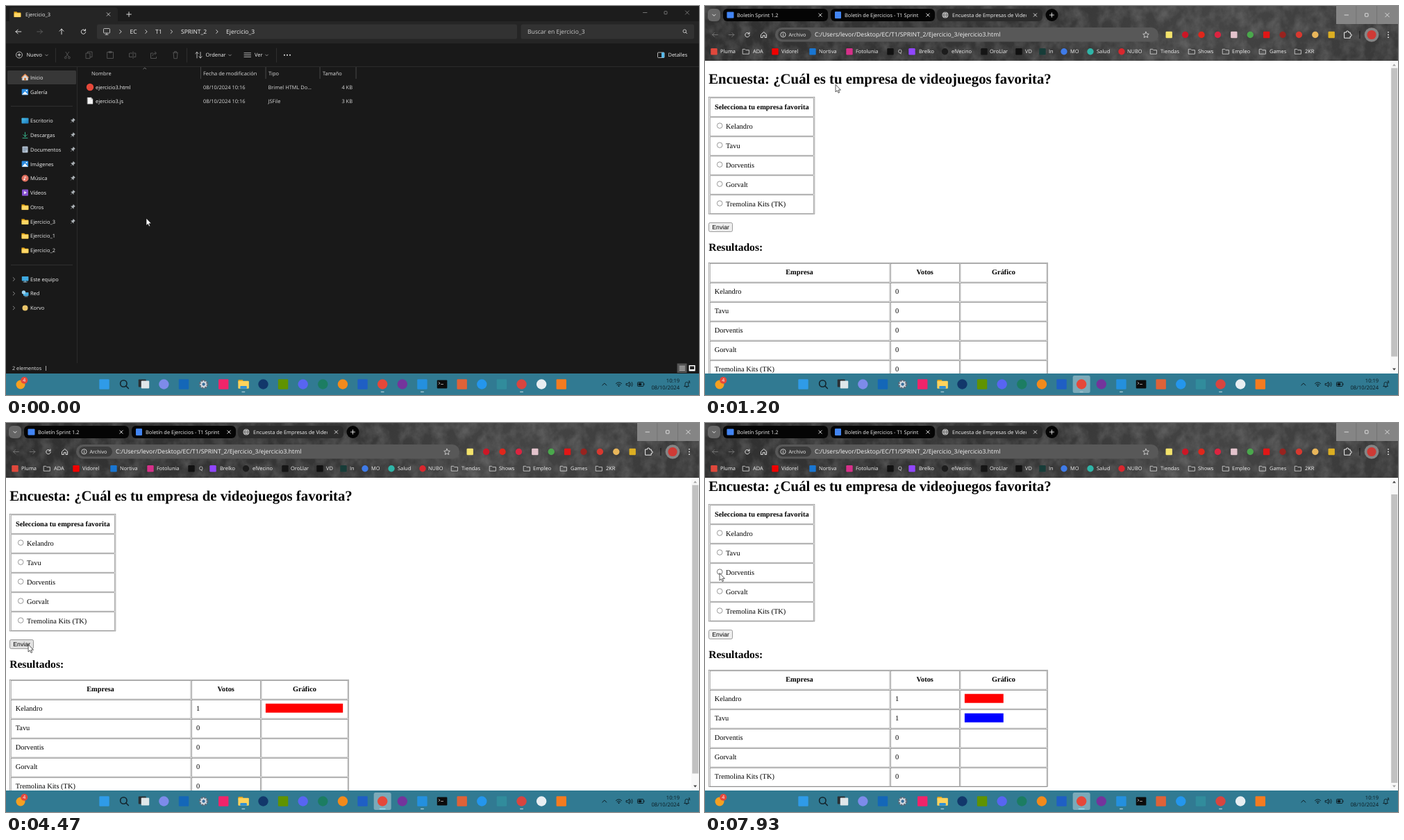
Recreate the animation shown at these times as an HTML page. Size 998x561 px, loop 8000 ms.

```html
<!DOCTYPE html>
<html lang="es">
<head>
<meta charset="utf-8">
<title>Encuesta</title>
<style>
html,body{margin:0;width:100%;height:100%;overflow:hidden;background:#191919}
svg{display:block;width:100vw;height:100vh}
text{font-family:'Open Sans','Noto Sans',sans-serif;font-size:7.45px;white-space:pre;text-rendering:geometricPrecision}
.serif text{font-family:'Liberation Serif',serif;font-size:10.4px}
</style>
</head>
<body>
<svg id="stage" viewBox="0 0 998 561" xmlns="http://www.w3.org/2000/svg"></svg>
<script>
const rect = (x, y, w, h, fill, r = 0, more = '') =>
  `<rect x="${x}" y="${y}" width="${w}" height="${h}" rx="${r}" fill="${fill}" ${more}/>`;
const disc = (x, y, r, fill, more = '') => `<circle cx="${x}" cy="${y}" r="${r}" fill="${fill}" ${more}/>`;
const line = (d, stroke = '#ddd', w = .8, fill = 'none') =>
  `<path d="${d}" stroke="${stroke}" stroke-width="${w}" fill="${fill}" stroke-linecap="round" stroke-linejoin="round"/>`;
const text = (x, y, s, fill = '#f2f2f2', size = 0, more = '') =>
  `<text x="${x}" y="${y}" fill="${fill}" ${size ? `style="font-size:${size}px"` : ''} ${more}>${s}</text>`;
const group = (id, inner, more = '') => `<g id="${id}" ${more}>${inner}</g>`;
const cross = (x, y, r, c = '#ddd') => line(`M${x - r} ${y - r}l${2 * r} ${2 * r}m0 ${-2 * r}l${-2 * r} ${2 * r}`, c, .8);
const plus = (x, y, r, c = '#eee') => line(`M${x - r} ${y}h${2 * r}M${x} ${y - r}v${2 * r}`, c, .9);
const chevR = (x, y, c = '#ddd') => line(`M${x - 1.3} ${y - 2.4}l2.5 2.4l-2.5 2.4`, c, .9);
const chevD = (x, y, c = '#aaa', r = 1.8) => line(`M${x - r} ${y - r / 2}l${r} ${r}l${r} ${-r}`, c, .8);
const folder = (x, y) => line(`M${x - 4.6} ${y - 3.6}h3.4l1.2 1.3h4.6v6h-9.2z`, '#e8a916', .5, '#e8a916') +
  rect(x - 4.8, y - 1.8, 9.6, 5.7, '#ffd766', .7);
const folderLine = (x, y) => line(`M${x - 4.4} ${y - 3.4}h3l1.2 1.3h4.6v5.6h-8.8z`, '#ddd', .8);
const lens = (x, y, r, c, w) => `<circle cx="${x}" cy="${y}" r="${r}" fill="none" stroke="${c}" stroke-width="${w}"/>` +
  line(`M${x + r * .7} ${y + r * .7}l${r * .8} ${r * .8}`, c, w);
const reload = (x, y) => line(`M${x + 2.7} ${y - 1.6}a3.2 3.2 0 1 0 .5 2.2M${x + 3} ${y - 3.6}v2.3h-2.3`, '#eee', .9);
const arrow = (x, y, dir, c) => `<g transform="translate(${x} ${y}) rotate(${dir})">${line('M-3.8 0h7.6M-3.8 0l3-3M-3.8 0l3 3', c, .9)}</g>`;

/* ---------- file manager ---------- */
const sideIcons = {
  home: y => line(`M23.5 ${y}l4-4l4 4v4h-8z`, '#d9d9d9', .5, '#d9d9d9') + line(`M22.8 ${y}l4.7-4.5l4.7 4.5`, '#ee8a4a', 1.2) + rect(26.3, y + .8, 2.4, 3.4, '#c8641e'),
  photo: y => rect(22.7, y - 4.3, 9.4, 8.6, '#2b8be0', 1) + line(`M23.5 ${y + 3.6}l3.8-4.2l4 4.2z`, '#fff', .4, '#fff') + disc(29.6, y - 2, 1, '#fff'),
  desk: y => rect(22.5, y - 4, 10, 8, 'url(#deskFill)', .8),
  down: y => line(`M27.5 ${y - 4}v6.2m-2.8-2.8l2.8 2.8l2.8-2.8M24 ${y + 4.2}h7`, '#35b48a', 1),
  doc: y => rect(23.5, y - 4.6, 8, 9.2, '#b9c7d6', .8) + line(`M25 ${y - 2}h5M25 ${y}h5M25 ${y + 2}h3`, '#4b647d', .7),
  music: y => disc(27.5, y, 5, '#e0705f') + line(`M27 ${y + 1.8}v-4l2 .8`, '#fff', .8) + disc(26.3, y + 1.8, 1, '#fff'),
  video: y => rect(23, y - 4.6, 9, 9.2, '#8550cf', 1) + line(`M26.3 ${y - 1.8}v3.6l3-1.8z`, '#fff', .4, '#fff'),
  dir: y => folder(27.5, y),
  pc: y => rect(22.8, y - 4, 9.6, 6.4, '#3fa9e0', .7) + line(`M27.6 ${y + 2.4}v1.6m-2.5 0h5`, '#9fc7dd', .9),
  net: y => rect(25, y - 1.8, 7.5, 5, '#43a9dd', .6) + disc(25.5, y - 1.8, 2.7, '#9fd4ee') + line(`M27 ${y + 4.2}h4`, '#9fc7dd', .8),
  dot: y => disc(27.5, y, 4, '#e9c46a')
};
const side = [['home', 'Inicio', 103], ['photo', 'Galería', 124], ['desk', 'Escritorio', 165.5], ['down', 'Descargas', 186.2],
  ['doc', 'Documentos', 207], ['photo', 'Imágenes', 227.8], ['music', 'Música', 248.5], ['video', 'Vídeos', 269.2], ['dir', 'Otros', 290],
  ['dir', 'Ejercicio_3', 311], ['dir', 'Ejercicio_1', 331.6], ['dir', 'Ejercicio_2', 352.4], ['pc', 'Este equipo', 394], ['net', 'Red', 414.7], ['dot', 'Korvo', 435.5]];
const pin = y => `<g transform="translate(96 ${y}) rotate(45)">${line('M-1.6 -3.2h3.2l-.4 2.6l1.3 1.4h-5l1.3-1.4zM0 .8v3', '#aeb4b8', .5, '#aeb4b8')}</g>`;

function explorer() {
  let s = rect(0, 0, 998, 530, '#191919') + rect(0, 0, 998, 54, '#1c1c1c') + rect(0, 22, 998, 32, '#252525') +
    rect(5, 2, 156, 24, '#252525', 4) + folder(16.5, 12) + text(28, 14.7, 'Ejercicio_3') + cross(147.5, 12, 2.3) + plus(177, 12, 3.3);
  s += line('M917.5 9.5h5.5', '#888', .8) + rect(948, 7.7, 4, 4, 'none', .6, 'stroke="#888" stroke-width=".8"') + cross(981, 9.5, 2.6, '#888');
  s += arrow(18, 37, 0, '#eee') + arrow(48.5, 37, 180, '#5e5e5e') + arrow(80, 37, 90, '#eee') + reload(111.5, 37);
  s += rect(131, 26.5, 605, 21, '#323232', 2.5) + rect(741.5, 26.5, 249.5, 21, '#323232', 2.5);
  s += rect(140.5, 32.5, 9, 6.6, 'none', 1, 'stroke="#ddd" stroke-width=".8"') + line('M143 41.3h4M145 39.2v2', '#ddd', .8);
  [165, 202, 238.5, 304].forEach(x => s += chevR(x, 37));
  [[178.5, 'EC'], [215, 'T1'], [252, 'SPRINT_2'], [317, 'Ejercicio_3']].forEach(([x, t]) => s += text(x, 40, t, '#f2f2f2', 8.5));
  s += text(751, 40, 'Buscar en Ejercicio_3', '#ccc', 8.5) + lens(977.3, 36.3, 2.3, '#ddd', .8);

  s += `<circle cx="19" cy="70.5" r="4.5" fill="none" stroke="#ddd" stroke-width=".8"/>` + plus(19, 70.5, 2) + text(29.5, 73.4, 'Nuevo') + chevD(58.5, 71);
  s += line('M71.5 61v20M260.5 61v20M389.5 61v20', '#383838', .7);
  s += line('M146 66.5h8.5v9h-8.5zM148.5 65.5h3.5v2h-3.5z', '#5c5c5c', .8);
  s += group('tools', `<path d="M85.8 66l4.6 7.2M90.8 66l-4.6 7.2M115 68h6v7.6h-6zM117.5 68v-2h6.5v7.6h-3M178 68h4M184 68h2.8v5.5h-2.8M182 73.5h-4.5v-5.5M183 65.5v10.5M212 68h-3.5v7.5h8v-2.5M211 72c.5-3 2.5-4 5-4m-2-2.2l2.6 2.2l-2.6 2.2M240.4 67.3h7.2M241.2 67.3l.6 8.4h4.6l.6-8.4M242.6 67v-1.4h2.8v1.4"/><circle cx="85.7" cy="74.5" r="1.4"/><circle cx="91" cy="74.5" r="1.4"/>`,
    'fill="none" stroke="#5c5c5c" stroke-width=".85" stroke-linejoin="round"');
  s += line('M275 75v-8.5m-2.2 2.2l2.2-2.2l2.2 2.2M280 66.5v8.5m-2.2-2.2l2.2 2.2l2.2-2.2', '#ddd', .8) + text(287.5, 73.4, 'Ordenar') + chevD(322.5, 71);
  s += line('M343 67.8h9.5M343 70.6h9.5M343 73.4h9.5', '#ddd', .8) + text(358, 73.4, 'Ver') + chevD(375.5, 71);
  [401, 405, 409].forEach(x => s += disc(x, 70.8, 1, '#eee'));
  s += rect(938.5, 67, 9.5, 7.5, 'none', 1, 'stroke="#ddd" stroke-width=".8"') + rect(944, 67, 4, 7.5, '#55b8ea', .6) + text(953.5, 73.4, 'Detalles');

  s += rect(0, 87, 998, .8, '#303030') + rect(102.2, 88, .8, 427, '#303030') + rect(2, 93, 99, 20, '#373737', 1.5);
  s += rect(7, 144.2, 89, .7, '#3a3a3a') + rect(7, 373, 89, .7, '#3a3a3a');
  side.forEach(([icon, name, y], i) => {
    s += sideIcons[icon](y) + text(35, y + 2.7, name);
    if (i > 1 && i < 10) s += pin(y);
    if (i > 11) s += chevR(11.5, y, '#999');
  });

  [280.5, 374, 452, 504].forEach(x => s += rect(x - .3, 88, .7, 17, '#5a5a5a'));
  s += line('M197.8 90.8l2-1.6l2 1.6', '#999', .7);
  [[123, 'Nombre'], [284, 'Fecha de modificación'], [378, 'Tipo'], [456, 'Tamaño']].forEach(([x, t]) => s += text(x, 99.8, t, '#dcdcdc'));
  s += rect(113.5, 109.5, 388.5, 15.5, '#383838', 1.5, 'id="row"');
  s += disc(121, 117, 5.2, '#e5483a') + line('M117.4 132h5.2l2.4 2.4v6.8h-7.6z', '#ccc', .4, '#f4f4f4') + line('M122.6 132v2.4h2.4', '#999', .6);
  [['ejercicio3.html', 'Brimel HTML Do...', '4 KB', 120.3], ['ejercicio3.js', 'JSFile', '3 KB', 139.7]].forEach(([n, k, z, y]) =>
    s += text(129, y, n) + text(284, y, '08/10/2024 10:16', '#d8d8d8') + text(377.5, y, k, '#d8d8d8') + text(499, y, z, '#d8d8d8', 0, 'text-anchor="end"'));
  s += text(9, 525, '2 elementos', '#e4e4e4', 7.35) + rect(57, 519, .8, 7, '#ccc') +
    group('picked', text(64, 525, '1 elemento seleccionado  3,05 KB', '#e4e4e4', 7.35) + rect(186, 519, .8, 7, '#ccc'));
  s += rect(966.5, 515.5, 14, 13.5, '#555') + line('M970 519.5h7.5M970 521.5h7.5M970 523.5h7.5M970 525.5h7.5', '#eee', .7) +
    rect(983.5, 518, 9, 8.5, '#fff', .6) + rect(985, 519.5, 6, 4.5, '#222');
  return s;
}

/* ---------- browser ---------- */
const marks = [['s', 13, '#e0483c', 'Pluma', 22], ['f', 59, 0, 'ADA', 69], ['s', 101, '#f00000', 'Vidorel', 110], ['s', 155, '#1976d2', 'Nortiva', 164],
  ['s', 208, '#d6308a', 'Fotolunia', 217], ['s', 267, '#111', 'Q', 278], ['s', 298, '#9146ff', 'Brelko', 308], ['c', 345.5, '#1c1c1c', 'elVecino', 355],
  ['s', 402, '#151515', 'OroLlar', 410], ['s', 452, '#101010', 'VD', 461], ['s', 486, '#173c38', 'In', 495], ['c', 517, '#3f7be8', 'MO', 526],
  ['c', 555, '#2fb5a8', 'Salud', 564], ['c', 600, '#d9272e', 'NUBO', 608], ['f', 646, 0, 'Tiendas', 656], ['f', 701, 0, 'Shows', 710],
  ['f', 750, 0, 'Empleo', 759], ['f', 803, 0, 'Games', 813], ['f', 854, 0, '2KR', 864]];
const addons = ['s#f3e36b', 'c#cc1626', 'c#e0261b', 'c#dc2440', 's#e3c3cc', 'c#4aa84c', 's#e01616', 'c#98231f', 'c#d8382f', 'c#e9b65a', 's#dcae22'];
const badge = (kind, x, y, r, c) => kind == 'c' ? disc(x, y, r, c) : rect(x - r, y - r, 2 * r, 2 * r, c, 1.2);

function tabBar() {
  let s = rect(0, 0, 998, 79, 'url(#barFill)') + rect(0, 0, 998, 79, '#000', 0, 'filter="url(#grunge)" opacity=".2"');
  s += rect(4, 4, 18, 18, '#666', 6) + chevD(13, 13.2, '#fff', 2.2);
  s += rect(26, 4, 151, 18, '#050505', 6) + rect(181, 4, 150, 18, '#050505', 6) + rect(334, 4, 152, 18, '#2c2c2c', 6) + disc(499.5, 13, 9, '#050505') + plus(499.5, 13, 3);
  s += rect(31.5, 8.5, 10, 9, '#4285f4', 1) + rect(187, 8, 9, 10, '#4285f4', 1) + disc(346, 13, 4.6, '#b8b8b8') +
    line('M341.5 13h9M346 8.5c-3 3-3 6 0 9c3-3 3-6 0-9', '#444', .6);
  s += text(46, 15.7, 'Boletín Sprint 1.2') + text(201, 15.7, 'Boletín de Ejercicios - T1 Sprint 1', '#f2f2f2', 0, 'clip-path="url(#clipB)"') +
    text(356, 15.7, 'Encuesta de Empresas de Videojuegos', '#f2f2f2', 0, 'clip-path="url(#clipC)"');
  [166, 321, 475.5].forEach(x => s += cross(x, 13, 2.2, '#fff'));
  s += rect(909, 0, 89, 26, '#858585') + rect(937.5, 0, .7, 26, '#6c6c6c') + rect(967, 0, .7, 26, '#6c6c6c') +
    line('M921 13h5.5', '#eee', .8) + rect(950.5, 10.7, 4.5, 4.5, 'none', .5, 'stroke="#eee" stroke-width=".8"') + cross(982.5, 13, 2.8, '#eee');
  s += arrow(14.5, 41.5, 0, '#777') + arrow(38, 41.5, 180, '#777') + reload(61, 41.5) + line('M80.8 41l3.9-3.5l3.9 3.5v4.5h-2.4v-2.8h-3v2.8h-2.4z', '#eee', .9);
  s += rect(101, 31, 552, 20.5, '#585858', 10.2) + rect(105, 34, 48, 14.5, '#3c3c3c', 7.2) +
    `<circle cx="112.5" cy="41.3" r="3.6" fill="none" stroke="#eee" stroke-width=".8"/>` + line('M112.5 41v2M112.5 39.3v.1', '#eee', .9) + text(120.5, 44, 'Archivo', '#eee', 7.2) +
    text(158, 44.3, 'C:/Users/levor/Desktop/EC/T1/SPRINT_2/Ejercicio_3/ejercicio3.html', '#f4f4f4', 8.65);
  s += line('M635 37.2l1.3 2.8l3 .4l-2.2 2.1l.6 3l-2.7-1.5l-2.7 1.5l.6-3l-2.2-2.1l3-.4z', '#ddd', .8);
  addons.forEach((a, i) => s += badge(a[0], 668.2 + 23.4 * i, 41.5, 4.7, a.slice(1)));
  s += line('M921 38h2.8a1.5 1.5 0 1 1 2.8 0h2.6v2.6a1.5 1.5 0 1 1 0 2.8v2.8h-8.2z', '#eee', 1) + rect(942.5, 36, .9, 11, '#111');
  s += disc(960, 41.5, 10.3, '#858585') + disc(960, 41.5, 6.6, '#cf3a35');
  [37.8, 41.5, 45.2].forEach(y => s += disc(984, y, .9, '#eee'));
  marks.forEach(([kind, x, c, name, tx]) => s += (kind == 'f' ? folderLine(x, 65.7) : badge(kind, x, 65.7, 4.7, c)) + text(tx, 68.3, name));
  return s;
}

const brands = ['Kelandro', 'Tavu', 'Dorventis', 'Gorvalt', 'Tremolina Kits (TK)'];
const cell = (x, y, w, h) => rect(x, y, w, h, 'none', 0, 'stroke="#646464" stroke-width=".56"');
const bold = 'font-weight="bold"', mid = bold + ' text-anchor="middle"';

function page() {
  let s = text(5.2, 112, 'Encuesta: ¿Cuál es tu empresa de videojuegos favorita?', '#000', 20.8, bold) +
    text(5.2, 353, 'Resultados:', '#000', 15.6, bold);
  s += cell(5.5, 131.2, 152.4, 168.8) + cell(5.5, 370.2, 488, 168.4) + text(81.8, 149, 'Selecciona tu empresa favorita', '#000', 0, mid);
  [[136, 'Empresa'], [316.7, 'Votos'], [430, 'Gráfico']].forEach(([x, t]) => s += text(x, 387.4, t, '#000', 0, mid));
  for (let i = 0; i < 6; i++) {
    s += cell(7.2, 132.8 + 28 * i, 149, 26.4);
    [[7.2, 258.8], [267.6, 98.8], [367.9, 124.2]].forEach(([x, w]) => s += cell(x, 371.7 + 28 * i, w, 26.4));
  }
  brands.forEach((b, i) => {
    const y = 28 * i;
    s += text(30, 177 + y, b, '#000') + text(13.7, 415 + y, b, '#000') + text(274, 415 + y, '0', '#000', 0, `id="vote${i}"`) +
      `<circle id="ring${i}" cx="21.2" cy="${172.6 + y}" r="3.8" fill="#fff" stroke-width=".75"/>` + disc(21.2, 172.6 + y, 2.3, '#0075ff', `id="dot${i}"`);
  });
  s += rect(373.9, 404.7, 111.3, 13, '#f00', 0, 'id="bar0"') + rect(373.9, 432.7, 55.9, 13, '#00f', 0, 'id="bar1"');
  s += rect(5.5, 312.6, 34, 12.8, '#efefef', 1.8, 'id="send" stroke="#6b6b6b" stroke-width=".65"') +
    text(22.6, 321.8, 'Enviar', '#000', 0, `text-anchor="middle" style="font-family:'Liberation Sans',sans-serif;font-size:8.67px"`);
  return s;
}

function browser() {
  return rect(0, 78, 998, 452, '#fff') + `<g clip-path="url(#view)">${group('page', page(), 'class="serif"')}</g>` +
    rect(987, 79, 11, 451, '#f8f8f8') + rect(988.2, 89.5, 9, 416, '#c1c1c1', 0, 'id="thumb"') +
    '<path id="up" d="M990 86.5h5l-2.5-3z"/><path id="downTip" d="M990 522.5h5l-2.5 3z"/>' + tabBar();
}

/* ---------- task bar ---------- */
const apps = [['s', '#2f9be8'], 'search', 'tasks', ['c', '#7d8bea'], ['s', '#1467b8'], 'gear', ['s', '#f0246a'], 'files', ['c', '#12386b'], ['s', '#5f9300'],
  ['c', '#5865f2'], ['c', '#1c7d62'], ['c', '#f28a1c'], ['s', '#1f5fc4'], ['c', '#e5483a'], ['c', '#74349c'], ['s', '#2490de'], 'term', ['s', '#df6238'],
  ['c', '#2496ed'], ['s', '#318c9c'], ['c', '#d8453f'], ['c', '#e8eef2'], ['s', '#f47b20']];
const appX = i => 141.5 + 28.62 * i;
const odd = {
  search: x => lens(x - .8, 544.5, 4.7, '#14242c', 1.6),
  tasks: x => rect(x - 8, 538.5, 11, 11, '#2a2f33', 1) + rect(x - 4, 540.5, 11.5, 11, '#dfe7ea', 1),
  gear: x => disc(x, 545.5, 5.5, '#d5dbe2', 'stroke="#5e6a78" stroke-width="2.6" stroke-dasharray="2.6 1.72"') + disc(x, 545.5, 2.2, '#386f9a'),
  files: x => rect(x - 7.5, 539, 7, 5, '#e0a11b', 1) + rect(x - 7.5, 540.8, 15.5, 11, '#ffd35c', 1) + rect(x - 4.5, 548, 9.5, 3.8, '#2f8fd8', 1),
  term: x => rect(x - 7.3, 539.5, 14.6, 12, '#0c0c0c', 1) + line(`M${x - 5} 542.5l2 1.5l-2 1.5M${x - 1.5} 545.5h3`, '#ddd', .7)
};
function taskbar() {
  let s = rect(0, 530, 998, 31, '#317a92');
  s += disc(21, 546, 6.5, '#f6a021') + disc(26.3, 539.8, 5, '#e4483b') + text(26.3, 542.4, '4', '#fff', 7, 'text-anchor="middle"');
  [7, 14].forEach(i => s += rect(appX(i) - 12.5, 533, 25, 25, '#fff', 2.5, `id="tile${i}"`));
  apps.forEach((a, i) => {
    const x = appX(i);
    s += typeof a == 'string' ? odd[a](x) : badge(a[0], x, 545.5, 7.2, a[1]);
    if ([7, 14, 16, 21].includes(i)) s += rect(x - 2.5, 555.8, 5, 1.5, '#9fc3cf', .7, `id="dash${i}"`);
  });
  const ink = '#0c1a20';
  s += line('M858.8 547l3-3l3 3', ink, 1) + line('M878.5 544.5q4-3.6 8 0M880 546.3q2.5-2.2 5 0', ink, 1) + disc(882.5, 548, 1, ink) +
    line('M893.5 544.5h1.8l2.5-2.3v7l-2.5-2.3h-1.8z', ink, .9) + line('M899.5 544q1.2 1.7 0 3.4M901.3 542.5q2.2 3 0 6.2', ink, .8);
  s += rect(909.5, 542.5, 8.5, 6, 'none', 1, `stroke="${ink}" stroke-width=".9"`) + rect(910.7, 543.7, 4.5, 3.6, ink) + rect(918.4, 544.3, 1, 2.4, ink);
  s += text(970, 542.6, '10:19', ink, 7.5, 'text-anchor="end"') + text(970, 552.8, '08/10/2024', ink, 7.65, 'text-anchor="end"');
  s += line('M977 548.5h6.5l-.9-1.5v-2.3a2.3 2.3 0 0 0-4.6 0v2.3zM979.3 549.8h2M983 541h2l-2 2.3h2', ink, .8);
  return s;
}

const defs = `<defs>
<linearGradient id="barFill" x2="1" y2=".06"><stop offset="0" stop-color="#303030"/><stop offset=".5" stop-color="#363636"/><stop offset=".75" stop-color="#454545"/><stop offset="1" stop-color="#3a3a3a"/></linearGradient>
<linearGradient id="deskFill" x2="1" y2="1"><stop offset="0" stop-color="#4cc3ee"/><stop offset="1" stop-color="#1a76b8"/></linearGradient>
<filter id="grunge" x="0" y="0" width="1" height="1"><feTurbulence type="fractalNoise" baseFrequency=".06 .05" numOctaves="4" seed="4"/><feColorMatrix values="0 0 0 0 .6 0 0 0 0 .6 0 0 0 0 .6 2 0 0 0 -.7"/></filter>
<clipPath id="clipB"><rect x="200" y="4" width="108" height="18"/></clipPath>
<clipPath id="clipC"><rect x="355" y="4" width="108" height="18"/></clipPath>
<clipPath id="view"><rect y="79" width="987" height="451"/></clipPath></defs>`;

document.getElementById('stage').innerHTML = defs + group('explorer', explorer()) +
  rect(0, 0, 1, 1, '#fff', 0, 'id="blank"') + group('browser', browser()) + taskbar() +
  '<path id="mouse" d="M0 0V10.6L2.4 8.4L4 12L5.7 11.2L4.1 7.8H7.4Z" fill="#fff" stroke="#000" stroke-width=".65" stroke-linejoin="round"/>';

/* ---------- motion ---------- */
const LOOP = 8000, STEP = 200 / 3;
const el = id => document.getElementById(id);
const set = (id, attrs) => { for (const k in attrs) el(id).setAttribute(k, attrs[k]); };
const show = (id, on) => set(id, { visibility: on ? 'visible' : 'hidden' });
const ramp = (t, a, b) => Math.min(1, Math.max(0, (t - a) / (b - a)));
const ease = p => p * p * (3 - 2 * p);
const mix = (a, b, p) => a + (b - a) * p;

// time, x, y of the pointer tip
const path = [[0, 202, 307], [130, 201, 275], [330, 191, 160], [470, 188, 116], [530, 188, 113], [1200, 188, 113], [1600, 194, 148], [1800, 204, 174],
  [1930, 204, 174], [2070, 200, 166], [2200, 200, 166], [2400, 180, 160], [2670, 90, 157], [2870, 36, 168], [3070, 22, 173], [3200, 22, 173],
  [3400, 25, 215], [3670, 31, 302], [3870, 32, 319.5], [4470, 32, 319.5], [4670, 48, 305], [5000, 98, 270], [5270, 118, 257], [5470, 95, 226],
  [5730, 44, 177], [5870, 30, 173], [6070, 24, 186.5], [6130, 23, 187], [6270, 23, 187], [6530, 26, 225], [6800, 32, 292], [7000, 32, 304],
  [7200, 32, 304], [7470, 27, 272], [7730, 22, 226], [7930, 21, 216.5], [8000, 21, 216.5]];
function tip(t) {
  const i = Math.max(1, path.findIndex(p => p[0] >= t)), a = path[i - 1], b = path[i], p = ramp(t, a[0], b[0]);
  return [mix(a[1], b[1], p), mix(a[2], b[2], p)];
}

function draw(now) {
  const t = Math.min(119, Math.floor((now % LOOP + 4) / STEP)) * STEP + 4;
  const [x, y] = tip(t), open = t >= 1200, picked = t >= 800;
  set('mouse', { transform: `translate(${x} ${y})` });

  show('explorer', !open);
  show('browser', open);
  show('picked', picked && !open);
  set('tools', { stroke: picked ? '#9fd2ec' : '#5c5c5c' });
  set('row', { fill: picked ? '#363636' : '#2e2e2e' });
  show('row', !open && (picked || y < 125));

  const g = ease(ramp(t, 1070, 1200));
  show('blank', t >= 1070 && !open);
  set('blank', { x: mix(247.5, 0, g), y: mix(244.5, 0, g), width: mix(535, 998, g), height: mix(284, 530, g) });

  set('tile7', { opacity: open ? 0 : .22 * ramp(t, 740, 930) });
  set('tile14', { opacity: open ? .36 : .24 * ramp(t, 870, 1070) });
  const wide = mix(5, 9, ramp(t, 1600, 1800));
  set('dash14', { x: appX(14) - wide / 2, width: wide, fill: t >= 1670 ? '#8fdcf2' : '#9fc3cf' });

  const off = 14 * ease(ramp(t, 4670, 4870)), py = y + off;
  set('page', { transform: `translate(0 ${-off})` });
  set('thumb', { y: 89.5 + off * .96 });
  set('up', { fill: off > 0 ? '#404040' : '#a3a3a3' });
  set('downTip', { fill: off < 14 ? '#404040' : '#a3a3a3' });

  const pick = t >= 3200 && t < 4270 ? 0 : t >= 6270 && t < 7070 ? 1 : -1;
  const votes = [t >= 4270, t >= 7070];
  brands.forEach((_, i) => {
    const over = Math.hypot(x - 21.2, py - 172.6 - 28 * i) < 4.5;
    set('ring' + i, { stroke: pick == i ? '#0075ff' : over ? '#444' : '#767676' });
    show('dot' + i, open && pick == i);
    el('vote' + i).textContent = votes[i] ? 1 : 0;
  });
  show('bar0', open && votes[0]);
  show('bar1', open && votes[1]);
  set('bar0', { width: votes[1] ? 55.9 : 111.3 });
  const hover = x < 40 && py > 312 && py < 326, press = t >= 4200 && t < 4270;
  set('send', { fill: press ? '#f5f5f5' : hover ? '#e2e2e2' : '#efefef' });
}

const start = performance.now();
function tick() {
  draw(performance.now() - start);
  requestAnimationFrame(tick);
}
tick();
</script>
</body>
</html>
```
